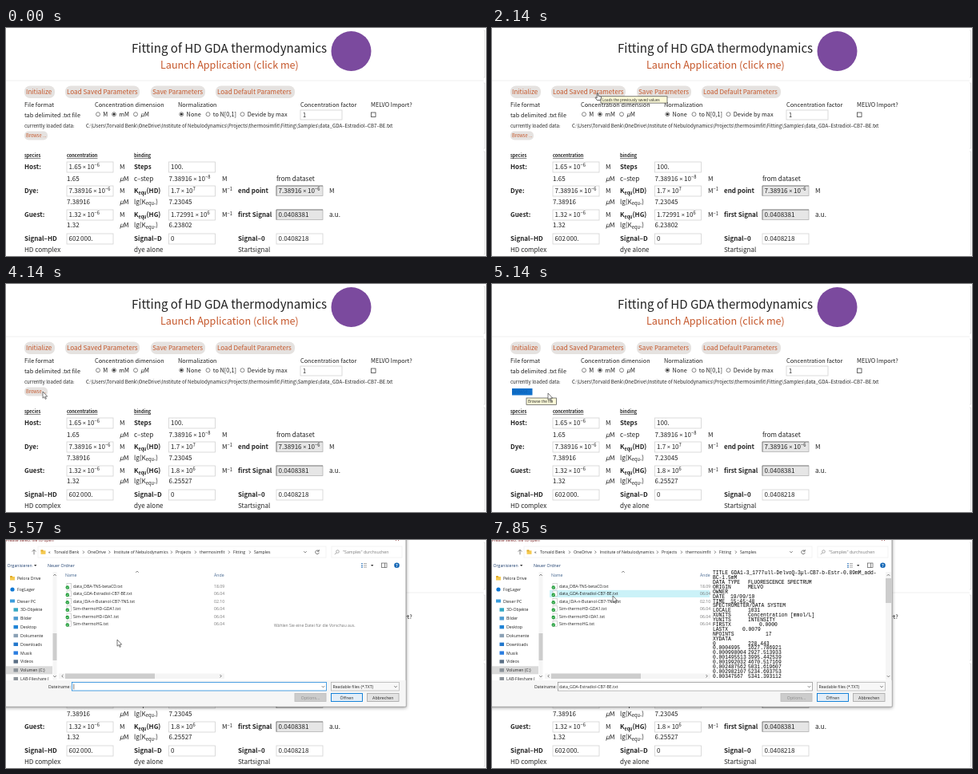
These frames come from a looping animation (600 by 286 pixels, 8000 ms). An HTML page:

```html
<!DOCTYPE html>
<html lang="en">
<head>
<meta charset="utf-8">
<title>Thermodynamics fitting</title>
<style>
  html, body { margin: 0; width: 100%; height: 100%; overflow: hidden; background: #fff; }
  svg { display: block; width: 100vw; height: 100vh; }
  text { white-space: pre; }
  .page { font-family: "Noto Sans CJK JP", "Noto Sans CJK SC", "Noto Sans CJK", Lato, sans-serif; fill: #222; }
  .ui, .times { font-family: "Open Sans", "Noto Sans", sans-serif; fill: #222; }
  .mono { font-family: "Liberation Mono", "DejaVu Sans Mono", monospace; fill: #000; }
  .shadow { filter: drop-shadow(0 1px 2px #0006); }
</style>
</head>
<body>
<svg id="stage" viewBox="0 0 600 286"></svg>
<script>
const LOOP = 8000, STEP = LOOP / 56;
const ORANGE = '#c5572b', BLUE = '#0078d7';

const text = (x, y, s, size, attrs = '') =>
  `<text x="${x}" y="${y}" font-size="${size}" ${attrs}>${s}</text>`;
const rect = (x, y, w, h, fill, attrs = '') =>
  `<rect x="${x}" y="${y}" width="${w}" height="${h}" fill="${fill}" ${attrs}/>`;
const path = (d, stroke = '#555', width = .7, fill = 'none') =>
  `<path d="${d}" fill="${fill}" stroke="${stroke}" stroke-width="${width}"/>`;
const dot = (x, y, r, fill, attrs = '') =>
  `<circle cx="${x}" cy="${y}" r="${r}" fill="${fill}" ${attrs}/>`;
const group = (id, body, cls = '') => `<g id="${id}" class="${cls}">${body}</g>`;

// ---- page ----
const BOLD = 'font-weight="700"';
const val = (x, y, s) => text(x, y, s, 8.07);
const bold = (x, y, s) => text(x, y, s, 8, BOLD);
const label = (x, y, s) => text(x, y, s, 7.33);
const sup = s => `<tspan dy="-2.6" font-size="5.8">${s}</tspan>`;
const power = (m, e) =>
  `${m}<tspan class="times" dx="1.6" font-size="7.4">×</tspan><tspan dx="1.6">10</tspan>${sup(e)}`;
const equ = (s, size = 5.4) =>
  `<tspan dy="1.6" font-size="${size}">equ</tspan><tspan dy="-1.6">${s}</tspan>`;
const MICRO = '<tspan font-style="italic">μ</tspan>M';

function field(x, y, s, grey) {
  const frame = grey
    ? rect(x, y, 58, 12.5, '#e6e6e6', 'stroke="#aaa" stroke-width=".7"') + path(`M${x} ${y + 12.5}V${y}H${x + 58}`, '#777', .8)
    : rect(x, y, 58, 13, '#fff', 'stroke="#d2d2d2" stroke-width=".8"');
  return frame + val(x + 2.5, y + 9, s);
}
const pill = (x, w, s) =>
  rect(x, 72.5, w, 15.5, '#e5e2e0', 'rx="7"') + text(x + 2, 83, s, 8.15, `fill="${ORANGE}"`);
const radio = (x, s, on) =>
  dot(x, 108.2, 2.5, '#fff', 'stroke="#555" stroke-width=".7"') +
  (on ? dot(x, 108.2, 1.4, '#222') : '') + label(x + 6.3, 111.3, s);
const head = (x, s) => text(x, 162, s, 5.6, BOLD + ' text-decoration="underline"');

const page = [
  path('M0 66H597', '#ececec', .8),
  path('M597 3H598.5V62H597M597 69H598.5V151H597M597 155H598.5V284H597', '#d4d4d4', .7),
  text(157, 30.5, 'Fitting of HD GDA thermodynamics', 15.1),
  text(193, 51, 'Launch Application (click me)', 12.6, `fill="${ORANGE}"`),
  dot(431.5, 29, 25, '#7b4a9e'),
  pill(23, 38, 'Initialize'), pill(74, 93, 'Load Saved Parameters'),
  pill(181, 68, 'Save Parameters'), pill(262, 99, 'Load Default Parameters'),
  label(23, 98.5, 'File format'), label(111, 98.5, 'Concentration dimension'),
  label(215, 98.5, 'Normalization'), label(368, 98.5, 'Concentration factor'),
  label(456, 98.5, 'MELVO Import?'), label(23, 111.5, 'tab delimited .txt file'),
  radio(115, 'M'), radio(135, 'mM', true), radio(162, MICRO),
  radio(219.3, 'None', true), radio(252.5, 'to N[0,1]'), radio(295.5, 'Devide by max'),
  rect(368, 103, 52, 12, '#fff', 'stroke="#d2d2d2" stroke-width=".8"'), label(371, 111.5, '1'),
  rect(456.5, 106, 5.5, 5.5, '#fff', 'stroke="#444" stroke-width=".8"'),
  text(23, 124.7, 'currently loaded data:', 6.1),
  text(100, 124.7, 'C:\\Users\\Torvald Benk\\OneDrive\\Institute of Nebulodynamics\\Projects\\thermosimfit\\Fitting\\Samples\\data_GDA–Estradiol–CB7–BE.txt', 6.17),
  group('browse', rect(23, 129.5, 29, 11, '#e5e2e0', 'rx="5"') +
    text(25, 137.2, 'Browse ...', 5.7, `fill="${ORANGE}"`)),
  group('pressed', rect(25, 131, 25.5, 8.5, '#1070cb') +
    text(25, 137.2, 'Browse ...', 5.7, 'fill="#0b5fb2"')),
  head(23, 'species'), head(76, 'concentration'), head(160, 'binding'),

  bold(23, 177, 'Host:'), field(76, 168, power('1.65', '−6')), val(142, 177, 'M'),
  bold(160, 177, 'Steps'), field(203.5, 168, '100.'),
  val(76, 192, '1.65'), val(142, 192, MICRO), val(160, 192, 'c–step'),
  val(203.5, 192, power('7.38916', '−8')), val(270, 192, 'M'), val(338, 192, 'from dataset'),

  bold(23, 207, 'Dye:'), field(76, 198, power('7.38916', '−6')), val(142, 207, 'M'),
  bold(160, 207, 'K' + equ('(HD)')), field(203.5, 198, power('1.7', '7')),
  val(270, 207, 'M' + sup('−1')), bold(290, 207, 'end point'),
  field(338, 198, power('7.38916', '−6'), true), val(404, 207, 'M'),
  val(76, 220.7, '7.38916'), val(142, 220.7, MICRO),
  val(160, 220.7, 'lg(K' + equ('.)', 5.8)), val(203.5, 220.7, '7.23045'),

  bold(23, 237.2, 'Guest:'), field(76, 228, power('1.32', '−6')), val(142, 237.2, 'M'),
  bold(160, 237.2, 'K' + equ('(HG)')),
  group('before', field(203.5, 228, power('1.72991', '6')) + val(203.5, 250, '6.23802')),
  group('after', field(203.5, 228, power('1.8', '6')) + val(203.5, 250, '6.25527')),
  val(270, 237.2, 'M' + sup('−1')), bold(290, 237.2, 'first Signal'),
  field(338, 228, '0.0408381', true), val(404, 237.2, 'a.u.'),
  val(76, 250, '1.32'), val(142, 250, MICRO), val(160, 250, 'lg(K' + equ('.)', 5.8)),

  bold(23, 267.3, 'Signal–HD'), field(76, 258, '602<tspan dx="1">000.</tspan>'),
  bold(160, 267.3, 'Signal–D'), field(203.5, 258, '0'),
  bold(290, 267.3, 'Signal–0'), field(338, 258, '0.0408218'),
  val(23, 281, 'HD complex'), val(160, 281, 'dye alone'), val(290, 281, 'Startsignal'),
].join('');

// ---- file dialog ----
const ui = (x, y, s, fill = '#222') => text(x, y, s, 5.2, `fill="${fill}"`);
const folder = (x, y) => rect(x, y - 2, 6, 4.5, '#f5c94f') + rect(x, y - 3, 3, 2, '#e0ac2c');
const chevron = (x, y, d = 1) => path(`M${x - d} ${y - 1.7}l${1.7 * d} 1.7l${-1.7 * d} 1.7`, '#444');
const down = (x, y) => path(`M${x - 1.7} ${y - .8}l1.7 1.7l1.7-1.7`, '#444');
const up = (x, y) => path(`M${x - 1.7} ${y + .8}l1.7-1.7l1.7 1.7`, '#444');

// vertical scrollbar between the top and bottom of the panes
const scrollbar = (x, w, thumbY, thumbH) =>
  rect(x, 40, w, 135.5, '#f5f5f5') + rect(x, thumbY, w, thumbH, '#cdcdcd') +
  up(x + w / 2, 44) + down(x + w / 2, 171);

const FILES = [
  ['data_DBA-TNS-betaCD.txt', '18.09'], ['data_GDA-Estradiol-CB7-BE.txt', '06.04'],
  ['data_IDA-n-Butanol-CB7-TNS.txt', '02.10'], ['Sim-thermoHD-GDA1.txt', '06.04'],
  ['Sim-thermoHD-IDA1.txt', '06.04'], ['Sim-thermoHG.txt', '06.04']];
const rowY = i => 58 + i * 9.4;
const fileRow = ([name, date], i) => {
  const y = rowY(i);
  return rect(76, y - 3.6, 5.5, 7, '#fff', 'stroke="#aaa" stroke-width=".5"') +
    dot(76.8, y + 1.5, 2.3, '#23a03c') + path(`M75.6 ${y + 1.5}l.9 .9l1.5-1.8`, '#fff', .6) +
    ui(84, y + 1.9, name) + ui(260, y + 1.9, date, '#777');
};

const TREE = [['3D-Objekte', '#35a8c4'], ['Bilder', '#4d9bd0'], ['Desktop', '#1f83d6'],
  ['Dokumente', '#8aa0b5'], ['Downloads', '#2277cc'], ['Musik', '#2b7de0'],
  ['Videos', '#5b6f86'], ['Volumen (C:)', '#8b9299'], ['LAB-Fileshare (', '#8b9299']];
const tree = folder(5, 48) + ui(14, 49.7, 'Pelora Drive') +
  dot(8, 62, 2.6, '#0f78d4') + ui(14, 63.8, 'FogLager') +
  rect(5, 74.5, 6, 4, '#3b9ddd') + ui(14, 78.5, 'Dieser PC') +
  rect(0, 158.3, 58, 10, '#d9d9d9') +
  TREE.map(([s, c], i) => {
    const y = 87.5 + i * 10.83;
    return rect(9.5, y - 2.2, 5.5, 4.4, c) + ui(18, y + 1.9, s);
  }).join('');

const CRUMBS = [[60, 'Torvald Benk'], [102, 'OneDrive'], [134.5, 'Institute of Nebulodynamics'],
  [212, 'Projects'], [242, 'thermosimfit'], [284, 'Fitting'], [310, 'Samples']];
const button = (x, w, s, fill, stroke, ink) =>
  rect(x, 192.5, w, 10, fill, `stroke="${stroke}" stroke-width=".9"`) +
  text(x + w / 2, 199.5, s, 5.2, `text-anchor="middle" fill="${ink}"`);

const dialog = [
  rect(-10, -10, 510, 219, '#fff', 'class="shadow" stroke="#8a8a8a" stroke-width=".8"'),
  ui(0, 1.6, 'Please select file to open', '#7a2020'),
  path('M487-3l4 4m0-4l-4 4', '#8c2a2a'),
  path('M35 18.3V12.3M32.7 14.6L35 12.2l2.3 2.4', '#555'),
  rect(40, 8, 360, 14, '#fff', 'stroke="#eee" stroke-width=".7"'),
  folder(43.5, 15.3), text(53, 16.8, '«', 5.2),
  CRUMBS.map(([x, s], i) => ui(x, 16.9, s) + (i ? chevron(x - 5, 15.2) : '')).join(''),
  down(374, 15), path('M390.8 13.8a2.3 2.3 0 1 0 .5 2M391.2 12v2.2h-2.2', '#444'),
  rect(407, 8, 88, 14, '#fff', 'stroke="#eee" stroke-width=".7"'),
  path('M413 16l-2.2 2.2M412.7 14.5a1.8 1.8 0 1 0 3.6 0a1.8 1.8 0 1 0-3.6 0', '#888'),
  ui(421, 16.9, '"Samples" durchsuchen', '#777'),
  ui(1.5, 33.6, 'Organisieren', '#1e3f6f'), path('M35 31h3.4l-1.7 2z', 'none', 0, '#333'),
  ui(52, 33.6, 'Neuer Ordner', '#1e3f6f'),
  path('M444 29.5h2m-2 2.3h2m-2 2.3h2', '#4b86c2', 1.2), path('M447 29.5h4m-4 2.3h4m-4 2.3h4', '#888'),
  path('M456 31h3.4l-1.7 2z', 'none', 0, '#333'),
  rect(469.5, 29, 6.5, 5.5, '#fff', 'stroke="#555" stroke-width=".7"'), path('M473.5 29v5.5', '#555'),
  dot(488.5, 31.8, 3.3, '#1266b5'), text(488.5, 33.8, '?', 5.2, 'text-anchor="middle" fill="#fff" font-weight="700"'),
  `<g clip-path="url(#body)">${tree}</g>`,
  scrollbar(58.5, 5, 117, 34),
  ui(74, 46.4, 'Name', '#44668f'), ui(260, 46.4, 'Ände', '#44668f'), up(164, 40),
  rect(72, 0, 200, 9.2, '#e6f8fc', 'id="hover"'),
  rect(72, rowY(1) - 4.6, 200, 9.2, '#cbf2f8', 'id="picked"'),
  FILES.map(fileRow).join(''),
  rect(66, 167.5, 207, 6.5, '#f5f5f5'), rect(74, 167.5, 112, 6.5, '#cdcdcd'),
  chevron(70.5, 170.7, -1), chevron(268.5, 170.7),
  rect(273, 40, 226, 136, '#fff'),
  text(335, 108.6, 'Wählen Sie eine Datei für die Vorschau aus.', 5.05, 'fill="#777" id="hint"'),
  rect(0, 176, 499.6, 32.6, '#f6f6f6'),
  ui(53, 186, 'Dateiname:'),
  rect(82.5, 178.5, 318, 10.5, '#fff', 'id="entry" stroke-width=".7"'),
  down(396.5, 184), path('M84.8 180.7V187.3', '#222', .6),
  rect(406.5, 178.5, 85, 10.5, '#f7f7f7', 'stroke="#adadad" stroke-width=".7"'),
  ui(408.5, 186, 'Readable files (*.TXT)'), down(487, 184),
  button(361, 39, 'Options...', '#ccc', '#bfbfbf', '#8a8a8a'),
  button(406.5, 39, 'Öffnen', '#e3eef8', BLUE, '#222'),
  button(451.5, 39.5, 'Abbrechen', '#e3e3e3', '#adadad', '#222'),
].join('');

// each preview line: label, column of the value, value
const LINES = [['TITLE GDA1-3_1777ull-DelvoQ-3µl-CB7-b-Estr-0.89mM_add-'], ['BC-1.5mM'],
  ['DATA TYPE', 320, 'FLUORESCENCE SPECTRUM'], ['ORIGIN', 320, 'MELVO'], ['OWNER'],
  ['DATE', 298, '19/09/10'], ['TIME', 298, '15:45:48'], ['SPECTROMETER/DATA SYSTEM'],
  ['LOCALE', 320, '1031'], ['XUNITS', 320, 'Concentration [mmol/L]'], ['YUNITS', 320, 'INTENSITY'],
  ['FIRSTX', 334, '0.0000'], ['LASTX', 313, '0.0079'], ['NPOINTS', 342, '17'], ['XYDATA'],
  ['0', 320, '228.443'], ['0.0004995', 320, '1627.786921'], ['0.000998004', 320, '2927.513933'],
  ['0.001495513', 320, '3995.442539'], ['0.001992032', 320, '4670.517169'],
  ['0.002487562', 320, '5031.619607'], ['0.002982107', 320, '5234.693753'],
  ['0.00347567', 320, '5341.393112']];
const preview = rect(274, 40, 225, 135.5, '#fff') + scrollbar(492, 7, 48, 31) +
  LINES.map(([s, x, v], i) => {
    const y = 43.3 + i * 5.88;
    return text(276, y, s, 6.32) + (v ? text(x, y, v, 6.32) : '');
  }).join('');

// ---- pointers and tooltips ----
const tip = (x, y, w, s) =>
  rect(x, y, w, 8.3, '#fdfbd9', 'stroke="#444" stroke-width=".7"') + text(x + 2, y + 5.9, s, 4.55);
const arrow = path('M0 0V8.2L1.9 6.5L3.2 9.4L4.4 8.9L3.1 6.1H5.7Z', '#222', .6, '#fff');
const hand = path('M-.8 0Q0-.8 .8 0V3.2L4 3.9Q4.7 4.2 4.5 5.6L3.7 8.6H-.6L-3 5.4Q-2.4 4.3-.8 5.6Z', '#222', .7, '#fff');
const beam = path('M-1.5-3.5Q0-3.5 0-2.7Q0-3.5 1.5-3.5M0-2.7V2.7M-1.5 3.5Q0 3.5 0 2.7Q0 3.5 1.5 3.5', '#222', .8);

const stage = document.getElementById('stage');
stage.innerHTML =
  '<clipPath id="body"><rect x="0" y="40" width="64" height="136"/></clipPath>' +
  rect(0, 0, 600, 286, '#fff') + group('page', page, 'page') +
  group('tipLoad', tip(136, 85.8, 83, 'Loads the previously saved values'), 'ui') +
  group('tipBrowse', tip(43, 143, 37.5, 'Browse the file'), 'ui') +
  group('dialog', dialog + group('chosen', rect(83.5, 179.2, 308, 9.2, '#fff') + ui(84, 186, FILES[1][0])) +
    group('preview', preview, 'mono'), 'ui') +
  group('pointer', group('arrow', arrow) + group('hand', hand) + group('beam', beam));

const $ = id => document.getElementById(id);
const show = (id, on) => $(id).setAttribute('visibility', on ? 'inherit' : 'hidden');

// time, x, y
const TRACK = [[850, 190, 130], [1280, 138, 85], [1570, 132, 82], [2560, 132, 82], [2990, 60, 133],
  [3280, 53, 136], [3700, 46, 135], [4420, 46, 135], [4700, 70, 137], [5280, 70, 137],
  [5570, 139, 125], [6000, 141, 112], [6700, 141, 67], [7000, 141, 67], [7420, 151, 70], [8000, 151, 70]];

function pointerAt(t) {
  const i = Math.max(1, TRACK.findIndex(k => k[0] >= t));
  const [t0, x0, y0] = TRACK[i - 1], [t1, x1, y1] = TRACK[i];
  const p = Math.min(1, Math.max(0, (t - t0) / (t1 - t0)));
  const e = p * p * (3 - 2 * p);
  return [x0 + (x1 - x0) * e, y0 + (y1 - y0) * e];
}

function draw(now) {
  const t = Math.floor((now % LOOP + 8) / STEP) % 56 * STEP;
  const [x, y] = pointerAt(t);
  const loaded = t >= 2560, open = t >= 5420, picked = t >= 7280;
  show('before', !loaded);
  show('after', loaded);
  show('tipLoad', t >= 1850 && t < 2560);
  show('pressed', t >= 4280);
  show('browse', t < 4280);
  show('tipBrowse', t >= 4990 && !open);
  show('dialog', open);
  for (const id of ['picked', 'chosen', 'preview']) show(id, open && picked);
  show('hint', open && !picked);
  $('entry').setAttribute('stroke', picked ? '#8a8a8a' : BLUE);

  const row = Math.round((y - rowY(0)) / 9.4);
  show('hover', open && !picked && row >= 0 && row < FILES.length);
  $('hover').setAttribute('y', rowY(row) - 4.6);

  const kind = t >= 1280 && t < 2700 ? 'hand' : t >= 2990 && t < 3560 ? 'beam' : 'arrow';
  for (const id of ['arrow', 'hand', 'beam']) show(id, id === kind);
  show('pointer', t >= 850);
  $('pointer').setAttribute('transform', `translate(${x.toFixed(2)} ${y.toFixed(2)})`);
}

const start = performance.now();
function tick() {
  draw(performance.now() - start);
  requestAnimationFrame(tick);
}
tick();
</script>
</body>
</html>
```
